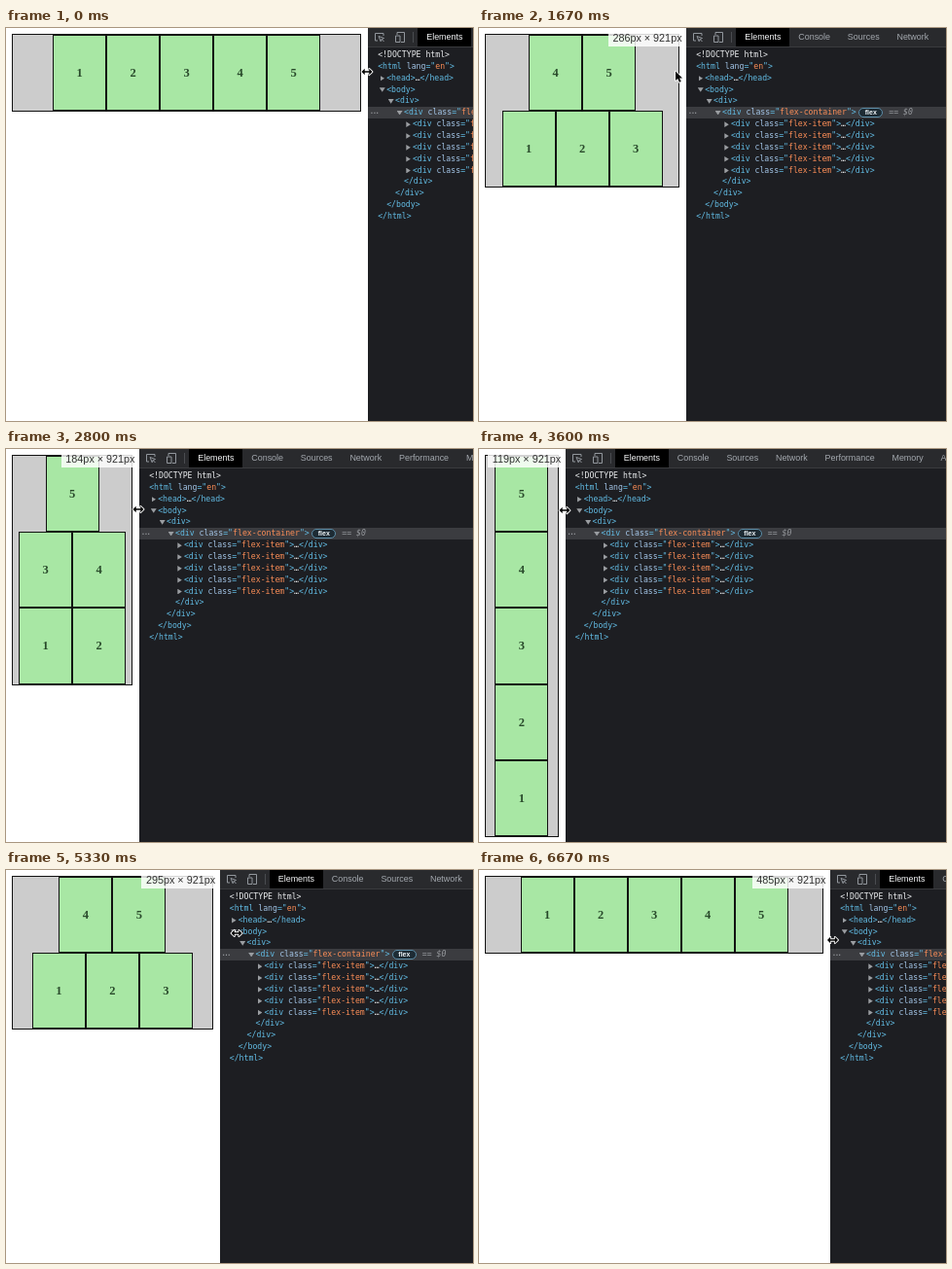
Recreate the animation shown at these times as an HTML page. Size 480x404 px, loop 6.74 s.

```html
<!DOCTYPE html>
<html lang="en">
<head>
<meta charset="utf-8">
<title>Flex wrap-reverse while resizing</title>
<style>
  html, body { margin: 0; width: 100%; height: 100%; overflow: hidden; background: #fff; }
  #stage { position: relative; width: 480px; height: 404px; overflow: hidden; --w: 372px; }
  #stage > * { position: absolute; box-sizing: border-box; }

  #container {
    left: 6px; top: 6px; width: calc(var(--w) - 12.8px);
    display: flex; flex-wrap: wrap-reverse; justify-content: center;
    background: #ccc; border: 1px solid #111;
  }
  #container b {
    box-sizing: border-box; width: 55px; height: 78.2px; border: 1px solid #111;
    background: #a8e7a4; color: #294a2b; text-align: center;
    font: bold 12.5px/76px "Liberation Serif", serif;
  }

  #size {
    right: calc(480px - var(--w)); top: 0; height: 19px; padding: 0 4.5px;
    background: rgba(255, 255, 255, .82); color: #303030; white-space: nowrap;
    font: 10.8px/20px "Liberation Sans", sans-serif;
  }

  #panel {
    left: var(--w); top: 0; width: 480px; height: 404px; overflow: hidden;
    background: #1d1e22; color: #62bce4; white-space: pre;
    font: 8.186px/11.86px "DejaVu Sans Mono", monospace;
  }
  #toolbar {
    position: absolute; left: 0; top: 0; width: 100%; height: 19.5px;
    display: flex; box-sizing: border-box; padding-left: 51.3px;
    background: #292a2d; border-bottom: 1px solid #3a3b3e; color: #a4a9af;
    font: 8.93px/19px "Liberation Sans", sans-serif;
  }
  #toolbar span { padding: 0 8.93px; height: 19px; }
  #toolbar span:first-of-type { background: #000; color: #f8f9fa; }
  #toolbar svg { position: absolute; left: 0; top: 0; fill: none; stroke: #92979d; }

  .row { position: absolute; left: 0; width: 100%; height: 11.86px; box-sizing: border-box; }
  .row.selected { background: #3b3c40; }
  .row i { position: absolute; background: #9a9da1; }
  .closed { width: 4.5px; height: 5.6px; margin: 3.2px 0 0 -6.6px; clip-path: polygon(0 0, 100% 50%, 0 100%); }
  .open { width: 6px; height: 4.6px; margin: 3.6px 0 0 -7.4px; clip-path: polygon(0 0, 100% 0, 50% 100%); }
  .name { color: #a4c6e8; }
  .value { color: #fa8d57; }
  .plain { color: #eceef0; }
  .dots { position: absolute; left: 1.6px; top: -1px; color: #a5a8ac; letter-spacing: -2.1px; }
  .badge {
    display: inline-block; box-sizing: border-box; width: 25px; height: 10px; margin-left: 2.5px;
    vertical-align: top; margin-top: 1px; border: 1px solid #5c8ca6; border-radius: 5px;
    background: #1d2b34; color: #eef3f6; text-align: center;
    font: bold 7px/7.8px "Liberation Sans", sans-serif;
  }
  .result { margin-left: 6px; color: #96999d; font-style: italic; }

  #cursor { left: 0; top: 0; overflow: visible; stroke: #fff; stroke-linejoin: round; paint-order: stroke; }
</style>
</head>
<body>
<div id="stage">
  <div id="container"><b>1</b><b>2</b><b>3</b><b>4</b><b>5</b></div>
  <div id="size"></div>
  <div id="panel"><div id="toolbar"><svg width="50" height="19">
      <path d="M10 13H7.5V5.500H16V8"/>
      <path d="M11 8.500l5.500 2-2.300 1-1 2.300zM14 11.500l2.500 2.500"/>
      <path d="M30 7V4.500H37.500V14.500H34M28.500 8H33V14.500H28.500z"/>
      <path d="M46.500 4V15" stroke="#4a4c50"/>
    </svg></div></div>
  <svg id="cursor" width="1" height="1">
    <path id="arrow" stroke-width="1.6" d="M0 0V9.600L2.200 7.600 3.900 11.300 5.700 10.500 4.100 6.900H7z"/>
    <path id="resize" stroke-width="1.8" d="M-5.500 0L-2.300-3.200V-.8H2.300V-3.200L5.500 0 2.300 3.200V.8H-2.300V3.200z"/>
  </svg>
</div>
<script>
const $ = id => document.getElementById(id);
const span = (cls, text) => `<span class="${cls}">${text}</span>`;
const open = (tag, attr, value) =>
  `&lt;${tag}${attr ? ` ${span("name", attr)}="${span("value", value)}"` : ""}&gt;`;
const close = tag => `&lt;/${tag}&gt;`;
const dots = span("plain", "…");

const item = [4, "closed", open("div", "class", "flex-item") + dots + close("div")];
const rows = [
  [0, "", span("plain", "&lt;!DOCTYPE html&gt;")],
  [0, "", open("html", "lang", "en")],
  [1, "closed", open("head") + dots + close("head")],
  [1, "open", open("body")],
  [2, "open", open("div")],
  [3, "open", open("div", "class", "flex-container") + span("badge", "flex") + span("result", "== $0")],
  item, item, item, item, item,
  [3, "", close("div")],
  [2, "", close("div")],
  [1, "", close("body")],
  [0, "", close("html")],
];
const selectedRow = 5;

$("toolbar").innerHTML += ["Elements", "Console", "Sources", "Network", "Performance",
  "Memory", "Application"].map(t => `<span>${t}</span>`).join("");
$("panel").innerHTML += rows.map(([depth, arrow, html], i) => {
  const selected = i === selectedRow;
  return `<div class="row${selected ? " selected" : ""}" style="top:${22 + 11.86 * i}px;` +
    `padding-left:${10.2 + 8.93 * depth}px">${selected ? span("dots", "...") : ""}` +
    `${arrow ? `<i class="${arrow}"></i>` : ""}${html}</div>`;
}).join("");

// Monotone cubic through [time, value] points.
function curve(points) {
  const slope = i => (points[i + 1][1] - points[i][1]) / (points[i + 1][0] - points[i][0]);
  const tangent = points.map((_, i) => {
    if (i === 0 || i === points.length - 1) return 0;
    const a = slope(i - 1), b = slope(i);
    return a * b > 0 ? 2 * a * b / (a + b) : 0;
  });
  return t => {
    let i = 0;
    while (i < points.length - 2 && t >= points[i + 1][0]) i++;
    const [t0, v0] = points[i], [t1, v1] = points[i + 1];
    const h = t1 - t0, u = Math.min(1, (t - t0) / h), r = 1 - u;
    return r * r * (1 + 2 * u) * v0 + u * u * (3 - 2 * u) * v1
      + h * u * r * (r * tangent[i] - u * tangent[i + 1]);
  };
}

const pageWidth = curve([[0, 372], [733, 297.5], [933, 274.5], [1667, 213], [2800, 137],
  [2933, 126.5], [3667, 88], [4400, 88], [4667, 135.5], [5333, 219.5], [5867, 307],
  [6600, 357.5], [6667, 361]]);
const cursorLead = curve([[0, -1], [933, -5.5], [1667, -11], [2800, -1], [4400, 0],
  [4667, 9.5], [5333, 17.5], [6667, 2.5]]);
const cursorY = curve([[0, 45], [933, 43.5], [1667, 44.5], [2800, 62], [4667, 64],
  [5333, 65], [6667, 72]]);

const LOOP = 6740, STEP = 200 / 3, ZOOM = 0.7442;

function draw(now) {
  const step = Math.min(100, Math.floor((now % LOOP + 5) / STEP));
  const t = step * STEP, w = pageWidth(t);
  const pointing = t > 300 && t < 2300;

  $("stage").style.setProperty("--w", w + "px");
  $("size").textContent = `${Math.round(w / ZOOM)}px × 921px`;
  $("size").style.visibility = step ? "visible" : "hidden";
  $("cursor").style.transform = `translate(${w + cursorLead(t)}px, ${cursorY(t)}px)`;
  $("arrow").style.display = pointing ? "" : "none";
  $("resize").style.display = pointing ? "none" : "";
}

const start = performance.now();
function tick() {
  draw(performance.now() - start);
  requestAnimationFrame(tick);
}
tick();
</script>
</body>
</html>
```
